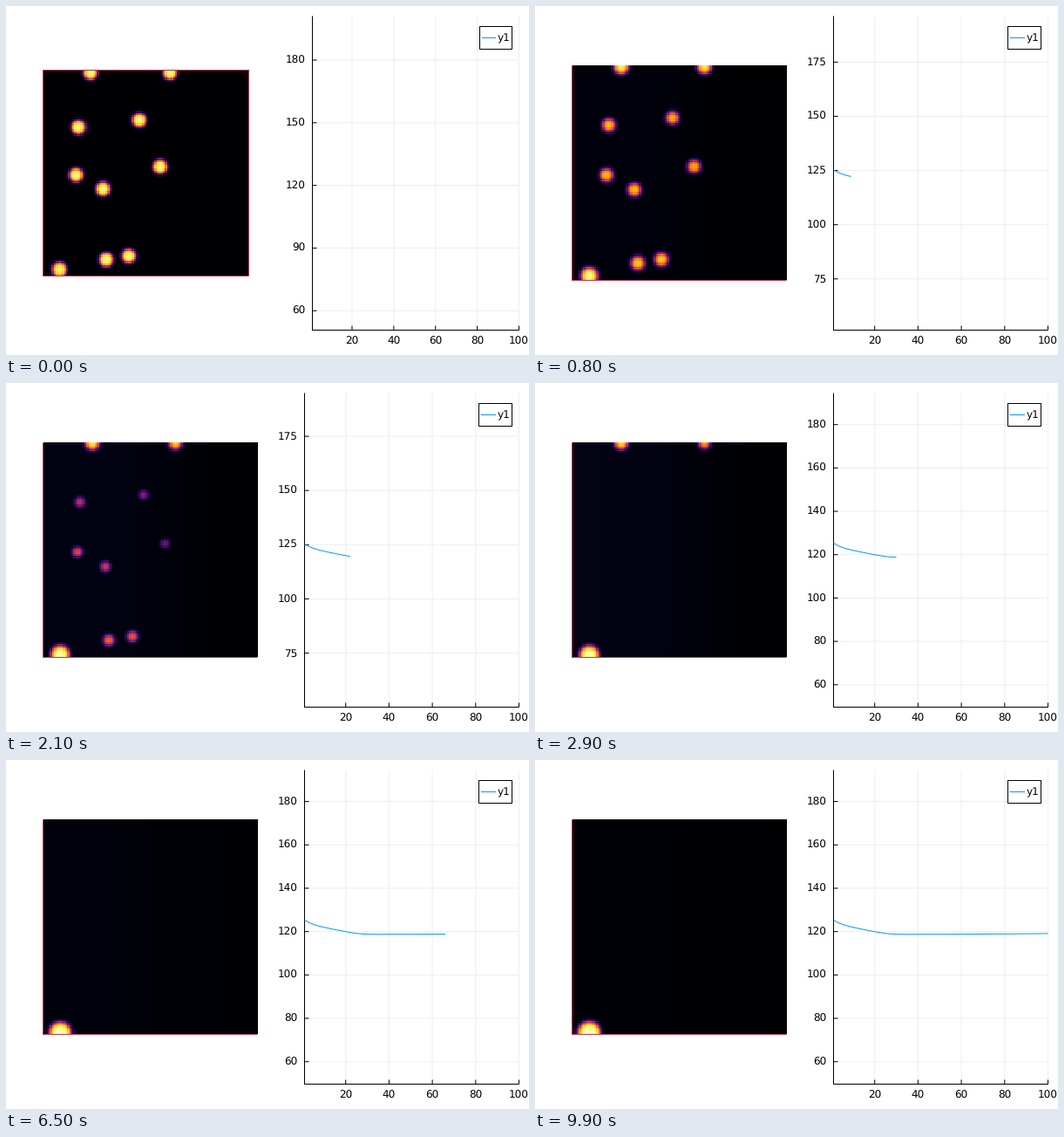
These frames come from a looping animation (600x400 px, 10000 ms). A matplotlib script:

```python
import matplotlib.pyplot as plt
import numpy as np
from matplotlib.animation import FuncAnimation
from matplotlib.patches import Rectangle

W, H, DPI = 600, 400, 100
PX = 72 / DPI
FRAMES = 100
CELLS = 100
TOP, BOTTOM, RIGHT = 11.5, 371.5, 588.5
MID = (TOP + BOTTOM) / 2
MAP_LEFT = 42.5
BLUE, EDGE, GRID = "#009afa", "#bb3754", "#eeeeee"

plt.rcParams.update({"font.family": "DejaVu Sans", "font.size": 12 * PX,
                     "text.hinting": "none", "path.snap": False})

# x, y (in cells, y down) and the step at which each droplet has dissolved
FREE = [(17.0, 27.9, 25.5), (46.6, 24.5, 24), (15.9, 51.1, 27),
        (28.9, 57.9, 26), (56.7, 47.1, 23.5), (30.5, 92.2, 29),
        (41.5, 90.5, 28)]
WALL = [(22.8, 57), (61.5, 43)]

c = np.arange(CELLS) + 0.5
CX, CY = np.meshgrid(c, c)
STEPS = np.arange(1, FRAMES + 1)


def energy(x):
    """Quick relaxation, steady loss until the droplets are gone, slow rise."""
    relax = 1.85 * np.exp(-(x - 1) / 3.5)
    loss = 0.188 * 2 * np.log1p(np.exp((26.5 - x) / 2))
    return 118.75 + relax + loss + 0.35 * (x / 100) ** 3


ENERGY = energy(STEPS)


def droplet(x, y, radius, width, amp):
    r = np.hypot(CX - x, CY - y)
    return amp * 0.5 * (1 - np.tanh((r - radius) / width))


def vapour(n):
    glow = 0.045 * (1 - np.exp(-n / 12)) * np.exp(-(n / 90) ** 2)
    return glow * 0.5 * (1 - np.tanh((CX - 60) / (15 + 0.6 * n)))


def field(n):
    fresh = np.exp(-n / 1.5)
    width = 1.25 - 0.3 * fresh
    u = vapour(n)

    wall_y = 1.5 * np.exp(-n / 8)
    for x, y, end in FREE + [(x, wall_y, end) for x, end in WALL]:
        left = max(end - n, 0)
        amp = left ** 1.3 / (left ** 1.3 + 6.5)
        radius = 1.6 + 1.9 * (1 - np.exp(-left / 18))
        amp += (0.97 - amp) * fresh
        radius += (3.3 - radius) * fresh
        u = np.maximum(u, droplet(x, y, radius, width, amp))

    # the survivor sinks to the wall and grows
    y = 99.5 - 2.5 * np.exp(-n / 15)
    radius = 5.4 - 2.0 * np.exp(-n / 45)
    amp = 1 - 0.05 * np.exp(-n / 8)
    return np.maximum(u, droplet(7.8, y, radius, width, amp))


def line(xs, ys, color="black", width=1.0, **kw):
    ax.plot(xs, ys, color=color, lw=width * PX, solid_capstyle="butt", **kw)


def label(x, y, text, ha):
    ax.text(x, y + 3.9, text, ha=ha, va="baseline")


def draw_map(n, size, framed):
    x0, x1 = MAP_LEFT, MAP_LEFT + size
    y0, y1 = MID - size / 2, MID + size / 2
    ax.imshow(field(n), cmap="inferno", vmin=0, vmax=1, aspect="auto",
              interpolation="nearest", extent=(x0, x1, y1, y0))
    line([x0, x0, x1], [y0, y1, y1], EDGE)
    if framed:
        line([x0, x1, x1], [y0, y0, y1], EDGE)


def draw_legend(left):
    ax.add_patch(Rectangle((left, 23.5), 580.5 - left, 26, fc="white",
                           ec="black", lw=PX, zorder=3))
    line([left + 2.5, 562], [36.5, 36.5], BLUE, zorder=4)
    ax.text(564, 40.9, "y1", va="baseline", zorder=4)


def draw_chart(n, left):
    scale = (RIGHT - left) / (FRAMES - 1)
    seen = ENERGY[:n + 1]
    lo, hi = seen.min(), seen.max()
    if n == 0:
        hi = lo + 1
    center = (lo + hi) / 2
    half = (BOTTOM - TOP) / 2 / scale
    bottom, top = center - half, center + half

    def px(x):
        return left + (x - 1) * scale

    def py(y):
        return MID - (y - center) * scale

    step = 30 if top > 200 else 25 if bottom > 50 or n < 22 else 20
    xticks = range(20, 101, 20)
    yticks = range(int(np.ceil(bottom / step)) * step, int(top) + 1, step)

    for x in xticks:
        line([px(x)] * 2, [TOP, BOTTOM], GRID)
    for y in yticks:
        line([left, RIGHT], [py(y)] * 2, GRID)

    line([left, left, RIGHT], [TOP, BOTTOM, BOTTOM])
    for x in xticks:
        line([px(x)] * 2, [BOTTOM, BOTTOM - 5])
        label(px(x), 383.5, str(x), "center")
    for y in yticks:
        line([left, left + 5], [py(y)] * 2)
        label(left - 8, py(y), str(y), "right")

    if n:
        line(px(STEPS[:n + 1]), py(seen), BLUE)


def draw(n):
    ax.clear()
    ax.axis("off")
    # room reserved for tick decimals narrows both panels at first
    decimals = 2 if n == 0 else 1 if n < 7 else 0
    draw_map(n, (246, 240, 236)[decimals], decimals > 0)
    draw_chart(n, (342.5, 347.5, 351.5)[decimals])
    draw_legend(543.5 if decimals else 542.5)
    ax.set_xlim(0, W)
    ax.set_ylim(H, 0)
    return []


fig = plt.figure(figsize=(W / DPI, H / DPI), dpi=DPI, facecolor="white")
ax = fig.add_axes([0, 0, 1, 1])
anim = FuncAnimation(fig, draw, frames=FRAMES, interval=100,
                     init_func=lambda: [], repeat=True, repeat_delay=0)
plt.show()
```
